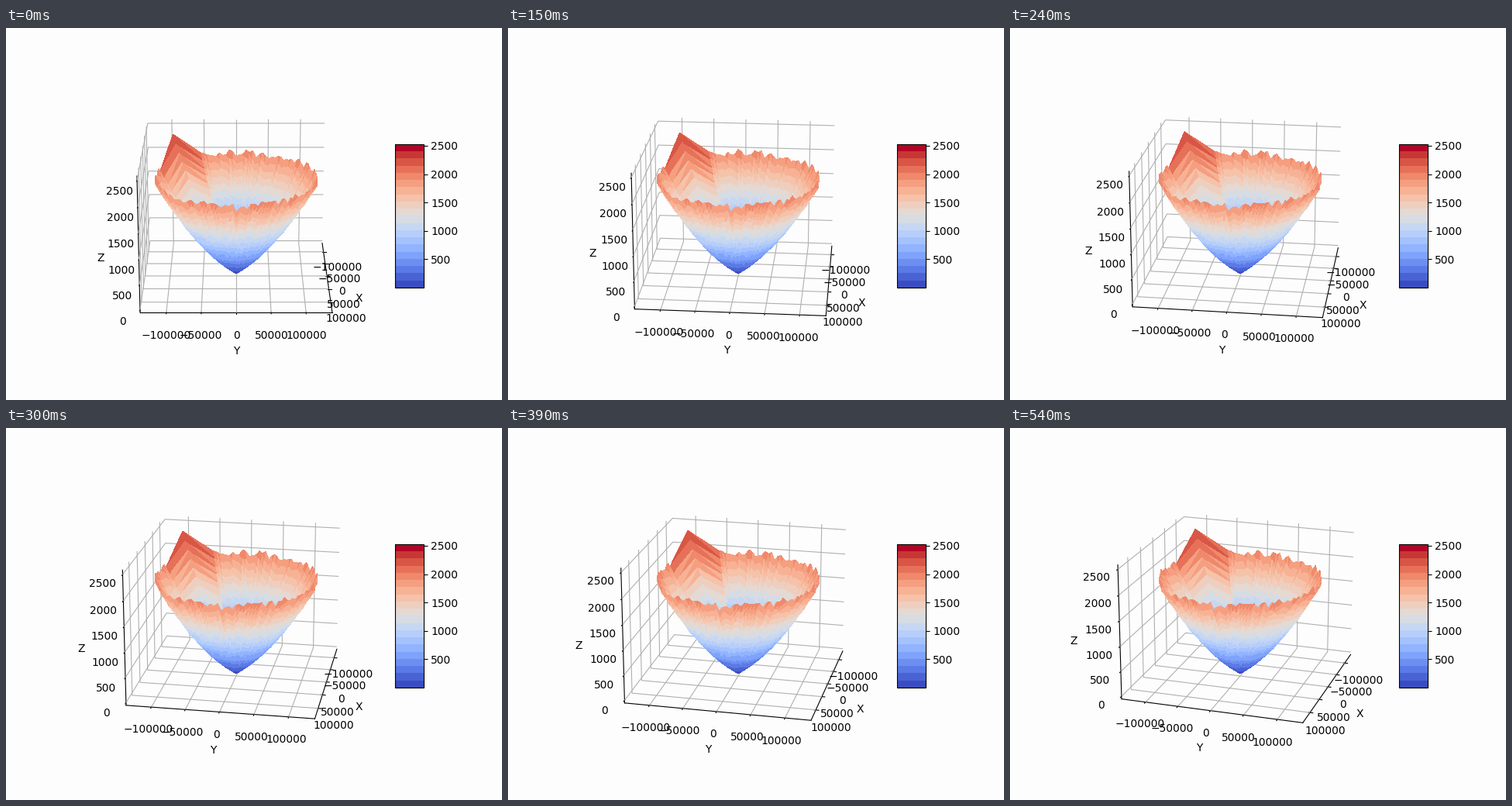
A matplotlib script that plays this animation: 640x480 px, repeating every 0.57 s.

```python
import numpy as np
import matplotlib.pyplot as plt
from matplotlib.animation import FuncAnimation
from matplotlib.cm import ScalarMappable
from matplotlib.collections import LineCollection, PolyCollection
from matplotlib.colors import Normalize

W, H = 640, 480
FRAMES, INTERVAL = 19, 30
BG = "#fdfdfd"
ELEV = np.radians(20)
DIST = 10
CENTRE = np.array([297.0, 237.4])   # where the box centre lands on the stage
SCALE = 1997.8                      # pixels per unit of projected size

LIMIT, RADIUS, PEAK, RIM = 132000, 120000, 2530, 1940
BOX = np.array([4, 4, 3]) * 1.82946 / np.sqrt(41)
DELTA = BOX / 12
EDGE = BOX / 2 + DELTA / 4
PER_POINT = 48 / (2 * 72 * 3.696)   # label offset in deltas per point

XY_TICKS = range(-100000, 100001, 50000)
Z_TICKS = range(0, 2501, 500)


def to_box(points):
    """Data coordinates to box units around the box centre."""
    size = np.array([2 * LIMIT, 2 * LIMIT, PEAK])
    middle = np.array([0, 0, PEAK / 2])
    return (np.asarray(points, float) - middle) / size * BOX


def project(points, azim):
    """Box units to stage pixels, plus the distance from the eye."""
    x, y, z = np.moveaxis(np.asarray(points, float), -1, 0)
    near = x * np.cos(azim) + y * np.sin(azim)
    right = y * np.cos(azim) - x * np.sin(azim)
    up = z * np.cos(ELEV) - near * np.sin(ELEV)
    depth = DIST - near * np.cos(ELEV) - z * np.sin(ELEV)
    flat = np.stack([right, -up], axis=-1) * SCALE / depth[..., None]
    return CENTRE + flat, depth


def make_surface():
    """Triangles of a ragged bowl with one tall fin, and their mean heights."""
    rng = np.random.default_rng(11)
    angles = np.append(np.linspace(-107.5, 207.5, 127), 232.9)
    rays = 1 + 0.022 * rng.standard_normal(angles.size).clip(-1.7, 1.7)
    rays[np.abs(angles) < 0.1] = 0.94
    rays[-2:] = 1.05, PEAK / RIM
    u = np.linspace(0, 1, 21)
    ripple = 1 + 0.006 * rng.standard_normal((angles.size, u.size))
    ripple[-1] = 1
    theta = np.radians(angles)[:, None]
    height = RIM * (0.553 * u + 0.447 * u ** 2) * rays[:, None] * ripple
    grid = np.stack([RADIUS * u * np.cos(theta),
                     RADIUS * u * np.sin(theta), height], axis=-1)
    after = np.roll(grid, -1, axis=0)
    a, b = grid[:, :-1], grid[:, 1:]
    c, d = after[:, 1:], after[:, :-1]
    tris = np.concatenate([np.stack(t, axis=2).reshape(-1, 3, 3)
                           for t in ((a, b, c), (a, c, d))])
    return to_box(tris), tris[..., 2].mean(axis=1)


def make_axis(i, tick_dir, flipped, ticks, name):
    """Frame line, grid lines, tick marks and labels of one axis."""
    base = -EDGE.copy()
    base[flipped] *= -1
    ends = np.array([base, base])
    ends[1, i] = EDGE[i]

    def outward(point, points):
        shift = np.sign(point) * points * PER_POINT * DELTA
        shift[i] = 0
        return point + shift

    marks, grid, labels = [], [], []
    for value in ticks:
        loc = to_box([value] * 3)[i]
        on_edge = base.copy()
        on_edge[i] = loc
        mark = np.array([on_edge, on_edge])
        mark[:, tick_dir] += np.array([-0.1, 0.2]) * DELTA[tick_dir]
        marks.append(mark)
        wall = -EDGE.copy()
        wall[i] = loc
        line = np.array([wall, wall, wall])
        line[0, (i + 1) % 3] *= -1
        line[2, (i + 2) % 3] *= -1
        grid.append(line)
        text = str(value).replace("-", "\N{MINUS SIGN}")
        labels.append((outward(on_edge, 11.5), text, "top"))
    middle = base.copy()
    middle[i] = 0
    labels.append((outward(middle, 25), name, "center"))
    return [ends] + marks, grid, labels


plt.rcParams["font.family"] = "DejaVu Sans"
fig = plt.figure(figsize=(W / 100, H / 100), dpi=100, facecolor=BG)
ax = fig.add_axes([0, 0, 1, 1])
ax.set(xlim=(0, W), ylim=(H, 0))
ax.axis("off")

dark, grid, labels = [], [], []
for spec in ((0, 1, 1, XY_TICKS, "X"), (1, 0, 0, XY_TICKS, "Y"),
             (2, 0, 0, Z_TICKS, "Z")):
    for total, part in zip((dark, grid, labels), make_axis(*spec)):
        total.extend(part)
dark, grid = np.array(dark), np.array(grid)
label_at = np.array([point for point, _, _ in labels])

tris, means = make_surface()
norm = Normalize(3, 2527)
cmap = plt.get_cmap("coolwarm", 20)
colors = cmap(norm(means))

dark_lines = LineCollection([], colors="black", linewidths=0.8, zorder=1,
                            capstyle="projecting")
grid_lines = LineCollection([], colors="#b0b0b0", linewidths=0.8, zorder=1.1)
surface = PolyCollection([], linewidths=0, antialiaseds=False, zorder=2)
for artist in (dark_lines, grid_lines, surface):
    ax.add_collection(artist, autolim=False)
texts = [ax.text(0, 0, text, fontsize=10, ha="center", va=va, zorder=1.2)
         for _, text, va in labels]

cax = fig.add_axes([501.6 / W, 145.2 / H, 36.96 / W, 184.8 / H])
fig.colorbar(ScalarMappable(norm, cmap), cax=cax, ticks=range(500, 2501, 500))


def update(frame):
    azim = np.radians(frame)
    dark_lines.set_segments(project(dark, azim)[0])
    grid_lines.set_segments(project(grid, azim)[0])
    flat, depth = project(tris, azim)
    order = np.argsort(-depth.mean(axis=1))
    surface.set_verts(flat[order])
    surface.set_facecolor(colors[order])
    for text, spot in zip(texts, project(label_at, azim)[0]):
        text.set_position(spot)
    return [dark_lines, grid_lines, surface, *texts]


anim = FuncAnimation(fig, update, frames=FRAMES, interval=INTERVAL,
                     repeat=True, repeat_delay=0)
plt.show()
```
